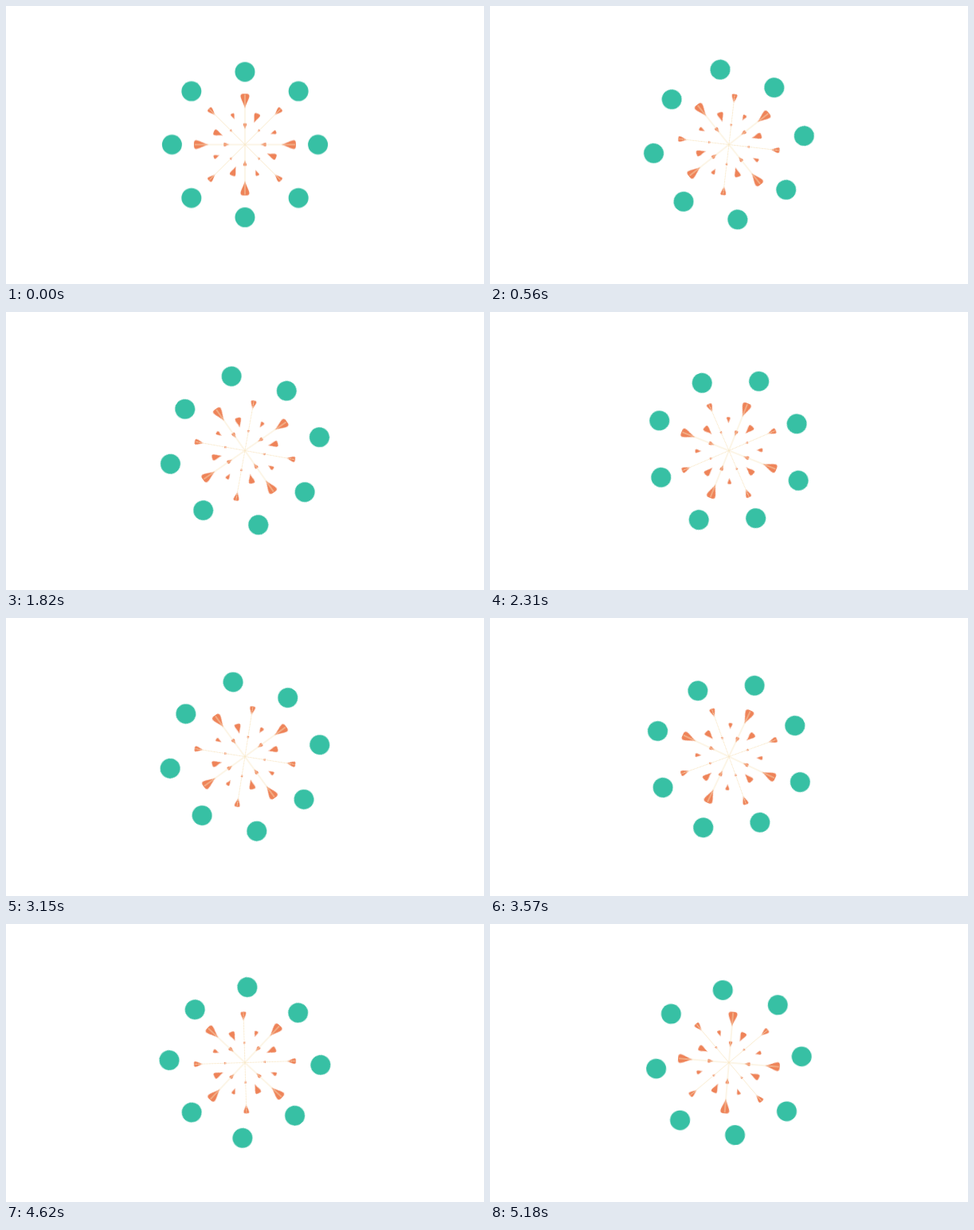
An HTML page that plays this animation: 600 px wide and 350 px high, repeating every 5250 ms.

```html
<!DOCTYPE html>
<html lang="en">
<head>
<meta charset="utf-8">
<title>Counter-rotating rings</title>
<style>
  html, body { margin: 0; width: 100%; height: 100%; overflow: hidden; background: #fff; }
  svg { display: block; width: 600px; height: 350px; }
  #dots { fill: #37c0a4; }
  #petals { fill: #ee8358; }
  #lines { stroke: #f8e6c2; stroke-width: .8; }
</style>
</head>
<body>
<svg viewBox="0 0 600 350">
  <g transform="translate(299.9 174.5)">
    <g id="star">
      <g id="petals"></g>
      <g id="lines"></g>
    </g>
    <g id="dots"></g>
  </g>
</svg>
<script>
  const LOOP = 5250, STEPS = 75;
  const PETAL = 'M0 18.5C-1.6 12-5.5 6-5.5 3C-5.5.4-4 0 0 0C4 0 5.5.4 5.5 3C5.5 6 1.6 12 0 18.5Z';

  const byId = id => document.getElementById(id);

  function add(parent, tag, attrs) {
    const el = document.createElementNS('http://www.w3.org/2000/svg', tag);
    for (const key in attrs) el.setAttribute(key, attrs[key]);
    byId(parent).append(el);
  }

  // [first angle, outer radius, scale], each repeated every quarter turn
  const petals = [
    [0, 64, 1], [0, 26.8, .4],
    [45, 64, .62], [45, 26.2, .23],
    [22.5, 42.3, .68], [-22.5, 42.3, .42]
  ];

  for (let turn = 0; turn < 360; turn += 90) {
    for (const [angle, radius, scale] of petals) {
      add('petals', 'path', {
        d: PETAL,
        transform: `rotate(${angle + turn}) translate(0 ${-radius}) scale(${scale})`
      });
    }
    for (const [angle, radius] of [[0, 91.6], [45, 95]]) {
      const transform = `rotate(${angle + turn})`;
      add('dots', 'circle', { cy: -radius, r: 12.5, transform });
      add('lines', 'line', { y2: -63, transform });
    }
  }

  function spin(id, degrees) {
    byId(id).animate(
      [{ transform: 'rotate(0deg)' }, { transform: `rotate(${degrees}deg)` }],
      { duration: LOOP, iterations: Infinity, easing: `steps(${STEPS}, end)` }
    );
  }

  spin('dots', 360);
  spin('star', -360);
</script>
</body>
</html>
```
